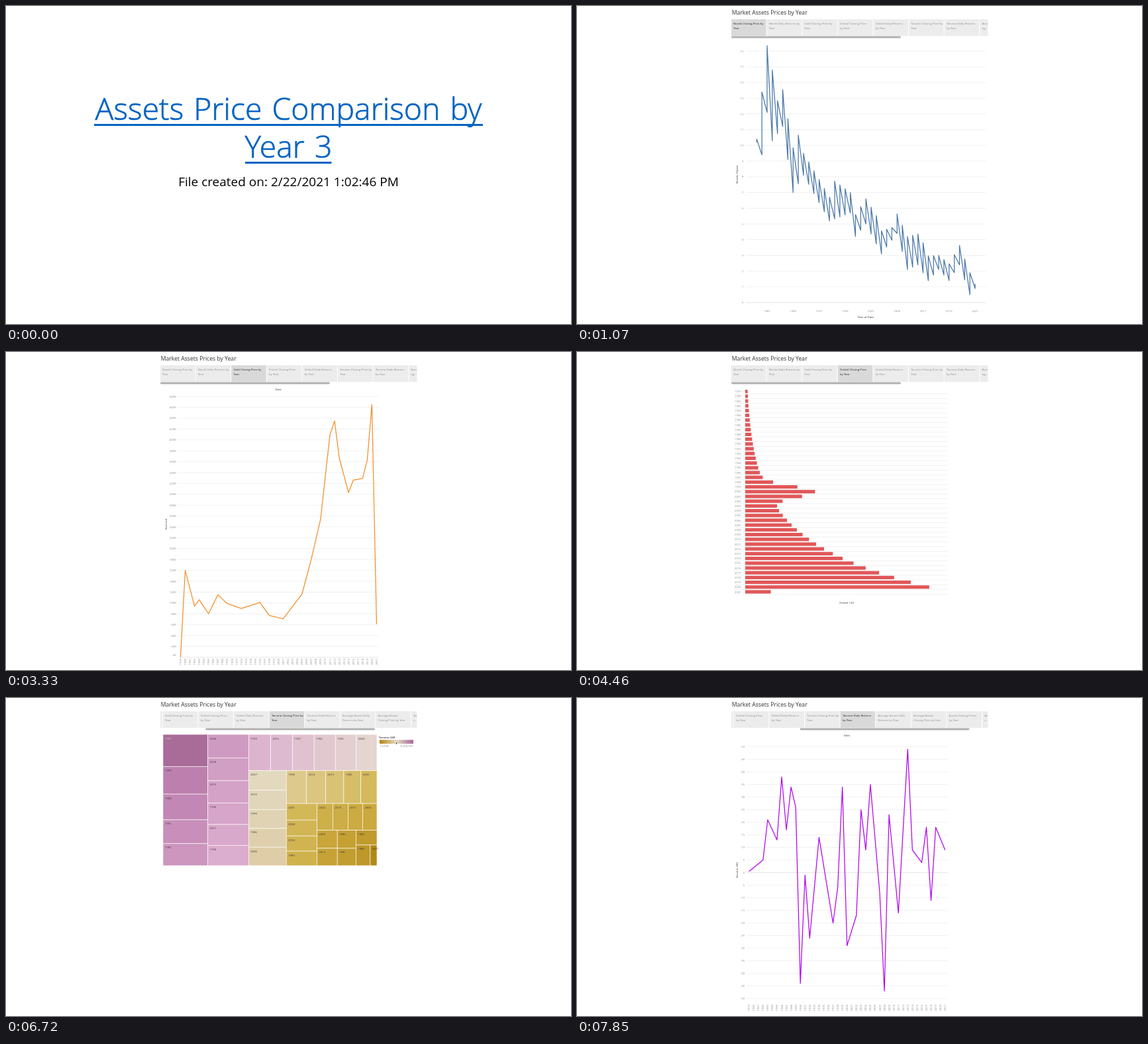
An HTML page that plays this animation: 853 px wide and 480 px high, repeating every 8 s.

```html
<!DOCTYPE html>
<html lang="en">
<head>
<meta charset="utf-8">
<title>Assets Price Comparison by Year</title>
<style>
  html, body { margin: 0; width: 100%; height: 100%; overflow: hidden; background: #fff; }
  svg { display: block; width: 100%; height: 100%; font-family: "Open Sans", "Noto Sans", sans-serif; }
  .small { font-size: 4.3px; }
</style>
</head>
<body>
<svg id="stage" viewBox="0 0 853 480">
  <defs>
    <clipPath id="strip"><rect x="233" y="20" width="387.4" height="25"/></clipPath>
    <linearGradient id="warmBlue">
      <stop offset="0" stop-color="#e0641c"/><stop offset=".36" stop-color="#f9b66a"/>
      <stop offset=".44" stop-color="#b5d9e8"/><stop offset="1" stop-color="#2a5c8c"/>
    </linearGradient>
    <linearGradient id="goldPink">
      <stop offset="0" stop-color="#b5860c"/><stop offset=".5" stop-color="#e4d9c6"/>
      <stop offset="1" stop-color="#a8669a"/>
    </linearGradient>
  </defs>
</svg>
<script>
const stage = document.getElementById('stage');
const FIRST = 1979, YEARS = 43;
const years = Array.from({ length: YEARS }, (_, i) => FIRST + i);

function add(parent, tag, attrs, content) {
  const el = document.createElementNS('http://www.w3.org/2000/svg', tag);
  for (const key in attrs) el.setAttribute(key, attrs[key]);
  if (content !== undefined) el.textContent = content;
  parent.append(el);
  return el;
}
const rect = (g, x, y, width, height, fill, more) =>
  add(g, 'rect', { x, y, width, height, fill, ...more });
const hline = (g, x1, x2, y, stroke = '#ededed') =>
  add(g, 'line', { x1, x2, y1: y, y2: y, stroke, 'stroke-width': 0.8 });
const label = (g, x, y, text, fill = '#8c8c8c', more) =>
  add(g, 'text', { x, y, fill, class: 'small', ...more }, text);
const upright = (g, x, y, text, fill, more) =>
  label(g, 0, 0, text, fill, { transform: `translate(${x} ${y}) rotate(-90)`, ...more });
const CENTER = { 'text-anchor': 'middle' }, END = { 'text-anchor': 'end' };
const HEADING = { ...CENTER, 'font-weight': 500 };

/* Key points { position: value } with straight lines between them */
function segment(keys, x) {
  const at = Object.keys(keys).map(Number);
  let i = 1;
  while (i < at.length - 1 && at[i] < x) i++;
  return [keys[at[i - 1]], keys[at[i]], (x - at[i - 1]) / (at[i] - at[i - 1])];
}
function valueAt(keys, x) {
  const [a, b, part] = segment(keys, x);
  return a + (b - a) * part;
}
function colorAt(keys, x) {
  const [a, b, part] = segment(keys, x);
  return `color-mix(in srgb, ${b} ${100 * part}%, ${a})`;
}
const series = keys => years.map(year => valueAt(keys, year));

/* Dashboard frame: heading, tab strip and its scrollbar */
const TABS = [
  ['Bonds Closing Price by', 'Year'], ['Bonds Daily Returns by', 'Year'],
  ['Gold Closing Price by', 'Year'], ['Ordvel Closing Price', 'by Year'],
  ['Ordvel Daily Returns', 'by Year'], ['Tarumo Closing Price by', 'Year'],
  ['Tarumo Daily Returns', 'by Year'], ['Average Assets Daily', 'Returns by Year'],
  ['Average Assets', 'Closing Price by Year'], ['Assets Closing Prices', 'by Year'],
  ['Assets Daily Returns', 'by Year']
];
const PITCH = 53.6, LEFT = 233, RIGHT = 620.4;

function dashboard(active) {
  const g = add(stage, 'g', {});
  add(g, 'text', { x: 233.7, y: 12.8, fill: '#333', 'font-size': 8.65 }, 'Market Assets Prices by Year');
  const scroll = Math.max(0, LEFT + active * PITCH - 397.6);
  const strip = add(g, 'g', { 'clip-path': 'url(#strip)' });
  TABS.forEach(([top, bottom], i) => {
    const x = LEFT + i * PITCH - scroll, on = i === active;
    if (x > RIGHT || x + PITCH < LEFT) return;
    rect(strip, x, 20, PITCH - 1, 25, on ? '#d9d9d9' : '#ececec');
    if (x < LEFT) return;
    const room = RIGHT - x, start = room > 10 ? 4 : 2;
    const lines = room < PITCH - 1
      ? [top.slice(0, start), top.slice(start, start * 1.5) + '...']
      : [top, bottom];
    lines.forEach((text, line) =>
      label(strip, x + 3.3, 28.4 + line * 6.4, text, on ? '#222' : '#8c8c8c'));
  });
  rect(g, LEFT + scroll * 0.66, 45.6, 255.8, 2.9, '#b0b0b0', { rx: 1.4 });
  return g;
}

/* Line charts */
function polyline(g, points, stroke) {
  add(g, 'polyline', {
    points: points.map(p => p.map(n => n.toFixed(2)).join()).join(' '),
    fill: 'none', stroke, 'stroke-width': 1.25, 'stroke-linejoin': 'round'
  });
}

function yAxis(g, from, to, step, yOf, x1, x2, unit = '') {
  for (let v = from; v <= to; v += step) {
    hline(g, x1, x2, yOf(v), v === 0 ? '#dcdcdc' : undefined);
    label(g, x1 - 3.6, Math.min(yOf(v), 457.8) + 1.6, v + unit, undefined, END);
  }
}

function yearLine(g, { values, x0, yOf, range, step, unit, color, title }) {
  const xOf = i => x0 + i * 7.047;
  yAxis(g, ...range, step, yOf, x0 - 3, xOf(YEARS - 1) + 3.5, unit);
  years.forEach((year, i) => upright(g, xOf(i) + 1.5, 472.6, year));
  label(g, x0 + 147.7, 58.4, 'Date', '#333', HEADING);
  upright(g, 243.2, 260, title, '#333', HEADING);
  polyline(g, values.map((v, i) => [xOf(i), yOf(v)]), color);
}
const PERCENT = { x0: 259.7, yOf: v => 263.6 - v * 3.8, range: [-50, 50], step: 5 };

// Bond yields: the year's low and the height of the upright stroke above it
const bondLow = series({
  1979: 10.2, 1980: 9.4, 1981: 12.1, 1982: 10.3, 1984: 11.2, 1986: 7, 1988: 8.1, 1993: 5.2,
  1997: 5.7, 1998: 4.2, 2000: 5, 2003: 3.1, 2006: 4.4, 2008: 2.1, 2010: 2.4, 2012: 1.4,
  2014: 2.1, 2016: 1.4, 2018: 2.4, 2020: 0.5, 2021: 0.9
});
const bondRise = series({
  1979: 0.2, 1980: 4, 1982: 4.5, 1983: 2.1, 1987: 3.1, 1988: 1.4, 1993: 1.5, 1994: 2.4,
  1997: 1.3, 2002: 1.8, 2005: 0.8, 2008: 2.1, 2011: 1.9, 2014: 0.9, 2020: 1.4, 2021: 0.3
});
const BLUE = '#4a77a8';

function bondPrices(g) {
  const xOf = i => 271.3 + i * 7.85, yOf = v => 447.6 - v * 23.72;
  yAxis(g, 0, 16, 1, yOf, 255, 617.5);
  for (let year = 1981; year <= 2021; year += 5)
    label(g, xOf(year - FIRST), 462.2, year, undefined, CENTER);
  label(g, 435.8, 471, 'Year of Date', '#333', HEADING);
  upright(g, 243.2, 254, 'Bonds 10year', '#333', HEADING);
  polyline(g, bondLow.flatMap((low, i) => [[xOf(i), yOf(low)], [xOf(i), yOf(low + bondRise[i])]]), BLUE);
}

function bondReturns(g) {
  const mid = bondLow.map((low, i) => low + bondRise[i] / 2);
  const values = mid.map((m, i) => i ? 100 * (m / mid[i - 1] - 1) : 0);
  yearLine(g, { ...PERCENT, values, color: BLUE, title: 'Bonds 10year' });
}

function goldPrices(g) {
  const values = series({
    1979: 0, 1980: 160, 1982: 94, 1983: 106, 1985: 80, 1987: 115, 1989: 99, 1992: 90, 1996: 101,
    1998: 77, 2001: 71, 2005: 116, 2007: 180, 2009: 254, 2011: 409, 2012: 435, 2013: 367,
    2015: 303, 2016: 326, 2018: 329, 2019: 363, 2020: 465, 2021: 61
  });
  yearLine(g, {
    values, x0: 263.5, yOf: v => 460.9 - v * 0.8205,
    range: [0, 480], step: 20, unit: 'K', color: '#f28e2b', title: 'Xau/usd'
  });
}

function tarumoReturns(g) {
  const values = series({
    1979: 0.5, 1982: 5, 1983: 21, 1985: 13, 1986: 38, 1987: 17, 1988: 34, 1989: 26, 1990: -44,
    1991: -1, 1992: -26, 1994: 14, 1997: -20, 1998: -6, 1999: 34, 2000: -29, 2002: -17, 2003: 25,
    2004: 9, 2005: 35, 2007: -8, 2008: -47, 2009: 23, 2011: -16, 2013: 49, 2014: 9, 2016: 4,
    2017: 18, 2018: -11, 2019: 18, 2021: 9
  });
  yearLine(g, { ...PERCENT, values, color: '#b106ee', title: 'Tarumo 240' });
}

/* Bars: steady growth with one early bubble and an unfinished last year */
function ordvelPrices(g) {
  years.forEach((year, i) => {
    const y = 56 + i * 7.2;
    const growth = 0.012 * Math.exp(i * 0.106) + 0.24 * Math.exp(-(((i - 21) / 1.6) ** 2));
    const share = year === 2021 ? growth / 8 : growth;
    label(g, 238, y + 5.1, year);
    hline(g, 237, 560, y + 7.2);
    rect(g, 254, y + 1, 300 * Math.min(share, 1), 5.2, '#e15759');
  });
  label(g, 407, 380, 'Ordvel 120', '#333', HEADING);
}

/* Treemaps: strips along the shorter side, each filled while its cells stay compact */
const COMPACT = 2.2;
const sum = list => list.reduce((a, b) => a + b, 0);

function stretch(areas, side) {
  const depth = sum(areas) / side;
  return Math.max(...areas.map(a => Math.max(a / depth ** 2, depth ** 2 / a)));
}

function treemap(g, { order, weights, colors, ink, paleInk, paleCount }) {
  const names = order.split(' ').map(n => (n > 78 ? '19' : '20') + n);
  let x = 237, y = 55, w = 323, h = 198;
  const raw = names.map((_, i) => valueAt(weights, i)), scale = w * h / sum(raw);
  const areas = raw.map(a => a * scale);

  for (let i = 0; i < areas.length;) {
    const upward = h <= w, side = Math.min(w, h);
    const strip = [areas[i]];
    while (i + strip.length < areas.length) {
      const longer = [...strip, areas[i + strip.length]];
      if (stretch(longer, side) > Math.max(COMPACT, stretch(strip, side))) break;
      strip.push(longer.at(-1));
    }
    const depth = sum(strip) / side;
    let offset = 0;
    for (const area of strip) {
      const length = area / depth;
      const [cx, cy, cw, ch] = upward
        ? [x, y + offset, depth, length] : [x + offset, y, length, depth];
      rect(g, cx, cy, cw, ch, '#fff', { stroke: '#fff', 'stroke-width': 0.6 })
        .style.fill = colorAt(colors, i);
      if (ch > 11) label(g, cx + 2.8, cy + 7.5, names[i], i < paleCount ? paleInk : ink);
      offset += length;
      i++;
    }
    if (upward) { x += depth; w -= depth; } else { y += depth; h -= depth; }
  }
}

function legend(g, title, x, width, paint, tick) {
  label(g, 562.8, 61, title, '#333', { 'font-weight': 600 });
  rect(g, x, 63.2, width, 5.8, `url(#${paint})`);
  rect(g, tick, 67.4, 1, 2.4, '#333');
}

function ordvelReturns(g) {
  treemap(g, {
    order: '99 91 03 20 09 98 95 13 19 80 85 17 96 97 83 89 82 10 12 92 88 93 14 07 06 04 21 16 86 15 81 84 87',
    weights: { 0: 5847, 1: 4120, 4: 3630, 7: 3003, 11: 2257, 12: 1942, 15: 1627, 19: 1378, 22: 1215, 23: 975, 29: 612, 30: 195, 32: 50 },
    colors: { 0: '#2b5b8b', 1: '#4a7eb0', 7: '#5f94c3', 11: '#6ea3cc', 19: '#88bcdb', 29: '#a0d1e6', 30: '#c8cbc8', 32: '#c8cbc8' },
    ink: '#2c3a46', paleInk: '#c3d5e7', paleCount: 10
  });
  legend(g, 'Ordvel 120', 575, 28.7, 'warmBlue', 586);
  label(g, 574, 68, '-63.5', undefined, END);
  label(g, 605, 68, '65.8');
}

function tarumoPrices(g) {
  treemap(g, {
    order: '89 90 88 91 87 20 18 19 96 17 94 93 15 97 92 95 00 07 16 99 86 06 98 14 13 85 05 01 08 04 84 02 10 11 03 09 12 83 81 82 80 21',
    weights: { 0: 3307, 1: 2835, 4: 2261, 11: 1836, 21: 1596, 26: 1212, 31: 972, 40: 675, 41: 315 },
    colors: {
      0: '#a96c98', 1: '#bd80ae', 4: '#cc96bf', 10: '#dbadce', 16: '#e4d5d0', 17: '#e2d9bf',
      21: '#decda7', 22: '#ddc98b', 26: '#d4ba5c', 34: '#cba93e', 40: '#be982a', 41: '#b0881a'
    },
    ink: '#40383a', paleInk: '#d6b5cc', paleCount: 1
  });
  legend(g, 'Tarumo 240', 564, 51, 'goldPink', 589);
  label(g, 564, 74.2, '13,098');
  label(g, 614.6, 74.2, '8,448,965', undefined, END);
}

function cover() {
  const g = add(stage, 'g', {}), blue = '#0563c1';
  const big = {
    x: 426.5, fill: blue, stroke: blue, 'stroke-width': 0.7,
    'font-size': 46.4, 'font-weight': 300, 'word-spacing': 3, ...CENTER
  };
  add(g, 'text', { ...big, y: 172.2 }, 'Assets Price Comparison by');
  add(g, 'text', { ...big, y: 229.2 }, 'Year 3');
  rect(g, 133, 178, 587, 3, blue);
  rect(g, 361, 235, 130.5, 3, blue);
  add(g, 'text', { x: 426.5, y: 272, 'font-size': 19, ...CENTER }, 'File created on: 2/22/2021 1:02:46 PM');
  return g;
}

const charts = [bondPrices, bondReturns, goldPrices, ordvelPrices, ordvelReturns, tarumoPrices, tarumoReturns];
const scenes = [cover(), ...charts.map((draw, i) => {
  const g = dashboard(i);
  draw(g);
  return g;
})];

/* Hard cuts: the cover, then one chart every HOLD ms */
const LOOP = 8000, COVER = 1070, HOLD = 1130;
const begin = performance.now();
function show(now) {
  const t = Math.max(0, now - begin) % LOOP;
  const current = t < COVER ? 0 : 1 + Math.floor((t - COVER) / HOLD);
  scenes.forEach((g, i) => g.setAttribute('display', i === current ? 'inline' : 'none'));
  requestAnimationFrame(show);
}
show(begin);
</script>
</body>
</html>
```
